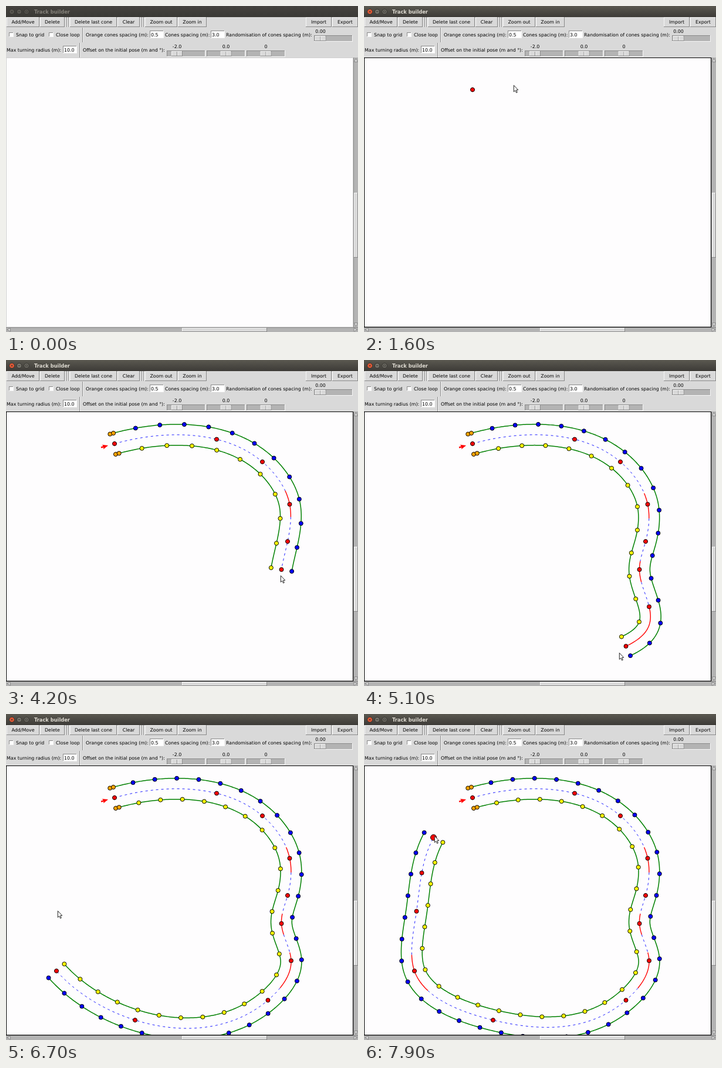
These frames come from a looping animation (600x557 px, 8 s). An HTML page with a canvas:

```html
<!DOCTYPE html>
<html lang="en">
<head>
<meta charset="utf-8">
<title>Track builder</title>
<style>
html, body { margin: 0; width: 100%; height: 100%; overflow: hidden; background: #d9d9d9; }
canvas { display: block; width: 600px; height: 557px; }
</style>
</head>
<body>
<canvas id="stage" width="600" height="557"></canvas>
<script>
const ctx = document.getElementById('stage').getContext('2d');
const LOOP = 8000, STEP = 100;
const METRE = 35.78 / 3, HALF = 1.5 * METRE, MIN_RADIUS = 10 * METRE;
const BG = '#d9d9d9', LIGHT = '#f6f6f6', SHADE = '#8a8a8a', TROUGH = '#b3b3b3';

// clicked points: time, x, y
const clicks = [
  [1100, 185, 143], [2100, 359, 135.5], [2500, 437, 174], [3000, 483.5, 246.5],
  [3500, 480, 310], [4000, 469.5, 358], [4600, 486, 421.5], [4900, 446.5, 489],
  [5600, 220, 523], [6200, 86, 439], [6800, 89.5, 337], [7300, 98.5, 271.5], [7700, 118.5, 211]
];
// pointer path: time, x, y
const pointer = [
  [100, 60, 14], [900, 185, 143], [1200, 185, 143], [1600, 255, 135], [2000, 358, 136],
  [2100, 359, 136], [2500, 437, 174], [2700, 470, 213], [2900, 482, 246], [3000, 483, 247],
  [3100, 483, 248], [3500, 480, 310], [3600, 479, 315], [4000, 469, 358], [4200, 468, 368],
  [4500, 486, 419], [4600, 486, 421], [4900, 446, 489], [5100, 435, 500], [5400, 280, 521],
  [5600, 220, 523], [5700, 218, 522], [6200, 86, 439], [6300, 85, 436], [6700, 88, 336],
  [6800, 89, 337], [7200, 98, 272], [7300, 98, 271], [7700, 118, 211], [7900, 120, 208]
];

/* ---------- geometry ---------- */

function solve(a, b) {
  const n = b.length;
  for (let c = 0; c < n; c++) {
    let p = c;
    for (let r = c + 1; r < n; r++) if (Math.abs(a[r][c]) > Math.abs(a[p][c])) p = r;
    [a[c], a[p]] = [a[p], a[c]];
    [b[c], b[p]] = [b[p], b[c]];
    for (let r = c + 1; r < n; r++) {
      const f = a[r][c] / a[c][c];
      for (let k = c; k < n; k++) a[r][k] -= f * a[c][k];
      b[r] -= f * b[c];
    }
  }
  for (let r = n - 1; r >= 0; r--) {
    for (let k = r + 1; k < n; k++) b[r] -= a[r][k] * b[k];
    b[r] /= a[r][r];
  }
  return b;
}

// second derivatives of a not-a-knot cubic spline
function bends(v, h) {
  const n = v.length, last = n - 1;
  const a = v.map(() => new Array(n).fill(0)), b = new Array(n).fill(0);
  for (let i = 1; i < last; i++) {
    a[i][i - 1] = h[i - 1];
    a[i][i] = 2 * (h[i - 1] + h[i]);
    a[i][i + 1] = h[i];
    b[i] = 6 * ((v[i + 1] - v[i]) / h[i] - (v[i] - v[i - 1]) / h[i - 1]);
  }
  a[0][0] = a[last][last] = 1;
  if (n === 3) {
    a[0][1] = a[2][1] = -1;
  } else if (n > 3) {
    const end = (row, i, j, k, p, q) => { row[i] = -q; row[j] = p + q; row[k] = -p; };
    end(a[0], 0, 1, 2, h[0], h[1]);
    end(a[last], last, last - 1, last - 2, h[last - 1], h[last - 2]);
  }
  return solve(a, b);
}

function evalSpline(v, m, h, i, s) {
  const H = h[i], A = (H - s) / H, B = s / H;
  return [
    A * v[i] + B * v[i + 1] + ((A ** 3 - A) * m[i] + (B ** 3 - B) * m[i + 1]) * H * H / 6,
    (v[i + 1] - v[i]) / H + ((3 * B * B - 1) * m[i + 1] - (3 * A * A - 1) * m[i]) * H / 6,
    A * m[i] + B * m[i + 1]
  ];
}

function sampleTrack(pts) {
  const xs = pts.map(p => p[0]), ys = pts.map(p => p[1]), h = [];
  for (let i = 1; i < pts.length; i++) h.push(Math.hypot(xs[i] - xs[i - 1], ys[i] - ys[i - 1]));
  const mx = bends(xs, h), my = bends(ys, h), out = [];
  h.forEach((len, i) => {
    const steps = Math.ceil(len / 2.5), extra = i === h.length - 1 ? 1 : 0;
    for (let k = 0; k < steps + extra; k++) {
      const s = len * k / steps;
      const [x, dx, ddx] = evalSpline(xs, mx, h, i, s);
      const [y, dy, ddy] = evalSpline(ys, my, h, i, s);
      const sp = Math.hypot(dx, dy);
      out.push({ x, y, tx: dx / sp, ty: dy / sp, bend: Math.abs(dx * ddy - dy * ddx) / sp ** 3 });
    }
  });
  return out;
}

// evenly spaced cones along a polyline, both ends included
function spread(line) {
  const acc = [0];
  for (let i = 1; i < line.length; i++)
    acc.push(acc[i - 1] + Math.hypot(line[i][0] - line[i - 1][0], line[i][1] - line[i - 1][1]));
  const total = acc[acc.length - 1], n = Math.max(2, Math.floor(total / (3 * METRE)));
  const out = [];
  for (let k = 0, i = 0; k < n; k++) {
    const d = total * k / (n - 1);
    while (i < acc.length - 2 && acc[i + 1] < d) i++;
    const f = (d - acc[i]) / (acc[i + 1] - acc[i]);
    out.push([0, 1].map(c => line[i][c] + (line[i + 1][c] - line[i][c]) * f));
  }
  return out;
}

const cache = {};
function track(n) {
  if (cache[n]) return cache[n];
  const mid = sampleTrack(clicks.slice(0, n).map(c => [c[1], c[2]]));
  const sides = [[1, '#00f'], [-1, '#ff0']].map(([sign, color]) => {
    const line = mid.map(p => [p.x + sign * HALF * p.ty, p.y - sign * HALF * p.tx]);
    return { line, color, cones: spread(line).slice(1) };
  });
  return cache[n] = { mid, sides };
}

/* ---------- drawing ---------- */

function rect(x, y, w, h, color) {
  ctx.fillStyle = color;
  ctx.fillRect(x, y, w, h);
}

function bevel(x, y, w, h, fill, top, bottom) {
  rect(x, y, w, h, bottom);
  rect(x, y, w - 1, h - 1, top);
  rect(x + 1, y + 1, w - 2, h - 2, fill);
}
const raised = (x, y, w, h) => bevel(x, y, w, h, BG, LIGHT, SHADE);
const sunken = (x, y, w, h, fill) => bevel(x, y, w, h, fill, SHADE, LIGHT);

function text(str, x, y, align = 'left', color = '#000', font = '7.9px') {
  ctx.font = font + ' "DejaVu Sans", sans-serif';
  ctx.textAlign = align;
  ctx.fillStyle = color;
  ctx.fillText(str, x, y);
}

function disc(x, y, r, fill, stroke = '#000') {
  ctx.beginPath();
  ctx.arc(x, y, r, 0, 2 * Math.PI);
  ctx.fillStyle = fill;
  ctx.fill();
  ctx.lineWidth = 1;
  ctx.strokeStyle = stroke;
  ctx.stroke();
}

function polygon(pts, fill, stroke) {
  ctx.beginPath();
  pts.forEach(p => ctx.lineTo(p[0], p[1]));
  ctx.closePath();
  ctx.fillStyle = fill;
  ctx.fill();
  if (stroke) {
    ctx.lineWidth = 1;
    ctx.strokeStyle = stroke;
    ctx.stroke();
  }
}

function button(label, x, w) {
  raised(x, 19, w, 17);
  text(label, x + w / 2, 30.2, 'center');
}

function divider(x, y, h) {
  rect(x, y, 1, h, SHADE);
  rect(x + 1, y, 1, h, LIGHT);
}

function entry(value, x, y) {
  sunken(x, y, 24, 13, '#fff');
  text(value, x + 2, y + 9.5);
}

function check(label, x) {
  sunken(x, 45, 8, 8, '#fff');
  text(label, x + 12, 51.7);
}

function scale(value, x, y, knob) {
  sunken(x, y, 66, 11, TROUGH);
  raised(knob, y + 1, 19, 9);
  rect(knob + 9, y + 2, 1, 7, SHADE);
  rect(knob + 10, y + 2, 1, 7, LIGHT);
  text(value, knob + 9.5, y - 3.6, 'center');
}

function titleBar(active) {
  const g = ctx.createLinearGradient(0, 0, 0, 19);
  g.addColorStop(0, active ? '#5a5850' : '#45433f');
  g.addColorStop(1, active ? '#3d3b37' : '#3a3935');
  rect(0, 0, 600, 19, g);
  const ink = active ? '#3a3935' : '#3b3a36', face = active ? '#75736b' : '#5a5852';
  disc(10, 9.7, 4.4, active ? '#ee5a35' : face, '#33322e');
  disc(22.5, 9.7, 4.2, face, '#33322e');
  disc(35, 9.7, 4.2, face, '#33322e');
  ctx.strokeStyle = ink;
  ctx.lineWidth = 1;
  ctx.beginPath();
  ctx.moveTo(8.3, 8); ctx.lineTo(11.7, 11.4);
  ctx.moveTo(11.7, 8); ctx.lineTo(8.3, 11.4);
  ctx.moveTo(20.5, 9.7); ctx.lineTo(24.5, 9.7);
  ctx.rect(33.3, 8.2, 3.4, 3);
  ctx.stroke();
  text('Track builder', 48, 13, 'left', active ? '#dfdbd2' : '#84817a', 'bold 8.3px');
}

function toolbar() {
  rect(0, 19, 600, 70, BG);
  button('Add/Move', 1, 56);
  button('Delete', 58, 42);
  divider(103, 19, 17);
  divider(106, 19, 17);
  button('Delete last cone', 109, 80);
  button('Clear', 190, 38);
  divider(231, 19, 17);
  divider(234, 19, 17);
  button('Zoom out', 237, 55);
  button('Zoom in', 293, 49);
  button('Import', 511, 44);
  button('Export', 556, 44);

  check('Snap to grid', 5);
  check('Close loop', 73);
  divider(130, 37, 25);
  text('Orange cones spacing (m):', 136, 51.7);
  entry('0.5', 245, 42);
  text('Cones spacing (m):', 271, 51.7);
  entry('3.0', 349, 42);
  text('Randomisation of cones spacing (m):', 375, 51.7);
  scale('0.00', 525, 50, 526.5);

  text('Max turning radius (m):', 1, 77.5);
  entry('10.0', 97, 68);
  divider(125, 63, 25);
  text('Offset on the initial pose (m and °):', 131, 77.5);
  scale('-2.0', 274, 76, 282);
  scale('0.0', 342, 76, 365.5);
  scale('0', 410, 76, 433.5);
}

function scrollbars() {
  rect(592, 88, 8, 461, TROUGH);
  rect(592, 88, 1, 461, SHADE);
  rect(0, 549, 600, 8, TROUGH);
  rect(0, 549, 600, 1, SHADE);
  raised(593, 319, 7, 111);
  raised(300, 550, 145, 7);
  polygon([[596.5, 89.5], [599.5, 95.5], [593.5, 95.5]], BG, SHADE);
  polygon([[596.5, 547.5], [599.5, 541.5], [593.5, 541.5]], BG, SHADE);
  polygon([[1.5, 553], [7.5, 550.5], [7.5, 556]], BG, SHADE);
  polygon([[599, 553], [593, 550.5], [593, 556]], BG, SHADE);
}

function strokeLine(pts, color, width) {
  ctx.beginPath();
  pts.forEach(p => ctx.lineTo(p[0], p[1]));
  ctx.strokeStyle = color;
  ctx.lineWidth = width;
  ctx.stroke();
}

function centreLine(mid, tight) {
  ctx.beginPath();
  let open = false;
  for (let i = 0; i < mid.length - 1; i++) {
    const isTight = mid[Math.max(0, i - 1)].bend > 1 / MIN_RADIUS;
    if (isTight !== tight) { open = false; continue; }
    if (!open) ctx.moveTo(mid[i].x, mid[i].y);
    ctx.lineTo(mid[i + 1].x, mid[i + 1].y);
    open = true;
  }
  ctx.setLineDash(tight ? [] : [4, 5]);
  ctx.strokeStyle = tight ? '#f00' : '#00f';
  ctx.lineWidth = tight ? 1.4 : 0.9;
  ctx.stroke();
  ctx.setLineDash([]);
}

function poseArrow(p) {
  const at = (d, s) => [p.x + d * METRE * p.tx - s * p.ty, p.y + d * METRE * p.ty + s * p.tx];
  strokeLine([at(-2, 0), at(-1.4, 0)], '#f00', 2.4);
  polygon([at(-0.95, 0), at(-1.75, 4), at(-1.6, 0), at(-1.75, -4)], '#f00');
}

function drawTrack(n, cursor) {
  if (n > 1) {
    const { mid, sides } = track(n), start = mid[0];
    sides.forEach(s => strokeLine(s.line, '#008000', 1.5));
    centreLine(mid, false);
    centreLine(mid, true);
    sides.forEach(s => {
      for (const d of [-METRE / 4, METRE / 4])
        disc(s.line[0][0] + d * start.tx, s.line[0][1] + d * start.ty, 3.5, '#ffa500');
      s.cones.forEach(c => disc(c[0], c[1], 3.5, s.color));
    });
    poseArrow(start);
  }
  clicks.slice(0, n).forEach(([, x, y]) => {
    const near = Math.hypot(x - cursor[0], y - cursor[1]) < 5;
    disc(x, y, near ? 5 : 3.5, '#f00');
  });
}

function pointerAt(t) {
  const i = Math.max(1, pointer.findIndex(k => k[0] >= t));
  const a = pointer[i - 1], b = pointer[i], f = (t - a[0]) / (b[0] - a[0]);
  return [a[1] + (b[1] - a[1]) * f, a[2] + (b[2] - a[2]) * f];
}

function drawPointer([x, y]) {
  const shape = [[0, 0], [0, 11], [2.5, 8.8], [4.3, 12.7], [6, 11.9], [4.3, 8.2], [7.4, 7.8]];
  polygon(shape.map(p => [x + 0.3 + p[0], y + 0.5 + p[1]]), '#fff', '#222');
}

function draw(t) {
  const n = clicks.filter(c => c[0] <= t).length, active = n > 0;
  const cursor = pointerAt(t);
  titleBar(active);
  toolbar();
  scrollbars();
  rect(0, 88, 592, 461, active ? '#000' : '#cfcfcf');
  rect(1, 89, 590, 459, '#fefdfe');
  ctx.save();
  ctx.beginPath();
  ctx.rect(1, 89, 590, 459);
  ctx.clip();
  drawTrack(n, cursor);
  ctx.restore();
  if (t >= pointer[0][0]) drawPointer(cursor);
}

let origin = null, shown = -1;
function tick(now) {
  if (origin === null) origin = now;
  const t = Math.floor(((now - origin) % LOOP) / STEP) * STEP;
  if (t !== shown) draw(shown = t);
  requestAnimationFrame(tick);
}
requestAnimationFrame(tick);
</script>
</body>
</html>
```
